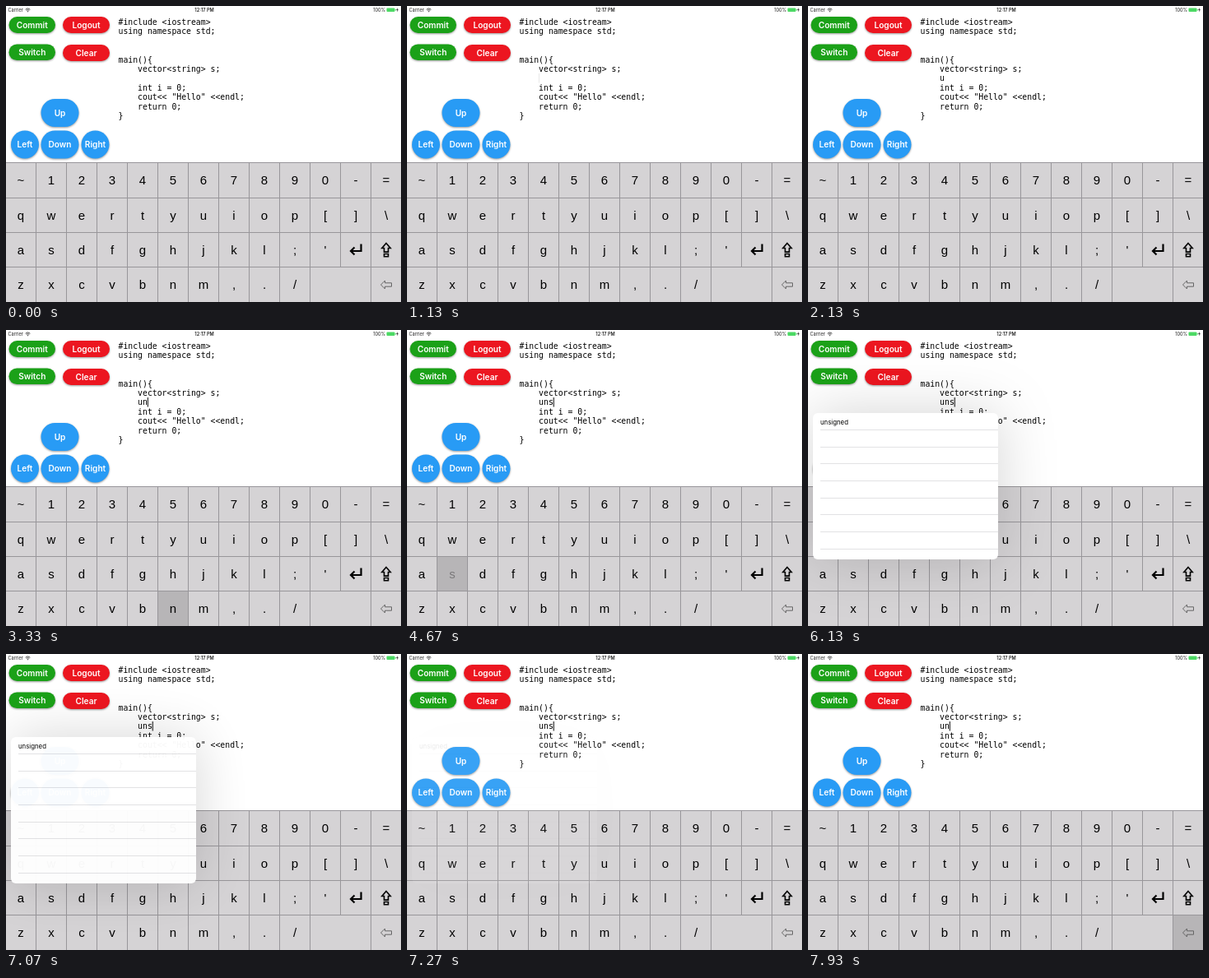
Recreate the animation shown at these times as an HTML page. Size 480 px wide and 360 px high, loop 8 s.

```html
<!DOCTYPE html>
<html lang="en">
<head>
<meta charset="utf-8">
<title>Code keyboard</title>
<style>
html, body { margin: 0; width: 100%; height: 100%; overflow: hidden; background: #fff; }
svg { display: block; width: 480px; height: 360px; }
text { white-space: pre; }
.ui { font-family: Inter, Roboto, sans-serif; }
.code { font: 9.8px "DejaVu Sans Mono", monospace; }
.key { font: 15px "Liberation Sans", Arial, sans-serif; text-anchor: middle; }
.btn text { font-size: 10.1px; font-weight: 600; fill: #fff; text-anchor: middle; }
.btn rect { filter: drop-shadow(0 1px 1px rgba(0,0,0,.4)); }
.status { font-size: 5.6px; fill: #222; }
.shade, .ripple, .typed { opacity: 0; }
.ripple { transform-box: fill-box; transform-origin: center; }

/* 1% = 80ms */
.shade, .label, .ripple, .popup, .blink { animation: 8s linear infinite; }
.typed, .caret { animation: 8s step-end infinite; }

.tap .shade { animation-name: tapShade; }
.tap .label { animation-name: tapLabel; }
.tap .shade, .tap .label { animation-delay: var(--at); }
@keyframes tapShade { 0% { opacity: 0 } 1.5%, 4.2% { opacity: 1 } 7.5%, 100% { opacity: 0 } }
@keyframes tapLabel { 0% { opacity: 1 } .8%, 1.6% { opacity: .4 } 2.6%, 100% { opacity: 1 } }

.hold .shade { animation-name: holdShade; }
.hold .label { animation-name: holdLabel; }
.hold .ripple { animation-name: holdRipple; }
@keyframes holdShade { 0%, 55.6% { opacity: 0 } 57%, 60% { opacity: 1 } 66%, 68% { opacity: .45 } 74%, 100% { opacity: 0 } }
@keyframes holdLabel { 0%, 55.6% { opacity: 1 } 56.5%, 59.5% { opacity: .33 } 61%, 100% { opacity: 1 } }
@keyframes holdRipple {
  0%, 59.5% { opacity: 0; transform: scale(.2) }
  61% { opacity: 1 }
  65.5%, 68% { opacity: 1; transform: none }
  74%, 100% { opacity: 0; transform: none }
}

.del .shade { animation-name: delShade; }
@keyframes delShade { 0%, 96.2% { opacity: 0 } 97.8%, 100% { opacity: 1 } }

.u { animation-name: typeU; }
.n { animation-name: typeN; }
.s { animation-name: typeS; }
@keyframes typeU { 0% { opacity: 0 } 18.2%, 100% { opacity: 1 } }
@keyframes typeN { 0% { opacity: 0 } 39.7%, 100% { opacity: 1 } }
@keyframes typeS { 0% { opacity: 0 } 56.6% { opacity: 1 } 97.5%, 100% { opacity: 0 } }

.caret { animation-name: step; }
@keyframes step {
  0% { transform: translateX(0) }
  18.2% { transform: translateX(5.9px) }
  39.7% { transform: translateX(11.8px) }
  56.6% { transform: translateX(17.7px) }
  97.5%, 100% { transform: translateX(11.8px) }
}
.blink { animation-name: blink; }
@keyframes blink {
  0%, 3% { opacity: 0 } 4.5%, 8% { opacity: 1 } 9.5%, 14% { opacity: 0 }
  15.5%, 24% { opacity: 1 } 25.6%, 28.4% { opacity: 0 } 30%, 33% { opacity: 1 }
  35%, 39.6% { opacity: 0 } 39.7%, 44.5% { opacity: 1 } 46.6%, 49% { opacity: 0 }
  50.5%, 53% { opacity: 1 } 54.5%, 56.5% { opacity: 0 } 56.6%, 68% { opacity: 1 }
  70%, 73% { opacity: 0 } 75%, 79% { opacity: 1 } 81%, 84% { opacity: 0 }
  86%, 91.5% { opacity: 1 } 93.5%, 97.4% { opacity: 0 } 97.5%, 99.8% { opacity: 1 } 100% { opacity: 0 }
}

.popup { animation-name: popup; }
.popup .panel { filter: drop-shadow(0 0 34px rgba(0,0,0,.17)); }
@keyframes popup {
  0%, 59.8% { opacity: 0 } 62.5%, 88.3% { opacity: 1 } 91.1%, 100% { opacity: 0 }
}
</style>
</head>
<body>
<svg viewBox="0 0 480 360">
  <rect width="480" height="360" fill="#fff"/>
  <g class="ui status">
    <text x="2.5" y="7">Carrier</text>
    <g fill="none" stroke="#222" stroke-width=".8">
      <path d="M23.6 4.2q2.9-2.6 5.8 0M24.7 5.4q1.8-1.6 3.6 0"/>
      <circle cx="26.5" cy="6.6" r=".4"/>
    </g>
    <text x="241" y="7" text-anchor="middle" font-weight="600">12:17 PM</text>
    <text x="461" y="7" text-anchor="end">100%</text>
    <rect x="462.5" y="2.5" width="10" height="4.5" rx="1" fill="#4cd964"/>
    <path d="M473.3 4v1.6" stroke="#4cd964"/>
    <path d="M476 2l-1.8 3h1.3l-.5 2.4 1.9-3.2h-1.3z"/>
  </g>
  <g id="code" class="code"></g>
  <g class="caret"><rect class="blink" x="159.9" y="82" width="1.2" height="11.5" fill="#222"/></g>
  <g id="buttons" class="ui btn"></g>
  <rect y="190" width="480" height="170" fill="#d5d3d5"/>
  <g id="keys"></g>
  <g id="popup" class="popup ui">
    <rect class="panel" x="6" y="101" width="225" height="178" rx="6" fill="#fff"/>
    <text x="15" y="114.5" font-size="7.8">unsigned</text>
  </g>
</svg>
<script>
const byId = id => document.getElementById(id);
const esc = s => s.replace(/&/g, "&amp;").replace(/</g, "&lt;");

// Code view
const advance = 5.9, leading = 11.4, left = 136.5, top0 = 23;
const line = (s, row, col = 0, cls = "") =>
  `<text class="${cls}" x="${left + col * advance}" y="${top0 + row * leading}">${esc(s)}</text>`;
const source = ["#include <iostream>", "using namespace std;", "", "", "main(){",
  "    vector<string> s;", "", "    int i = 0;", '    cout<< "Hello" <<endl;', "    return 0;", "}"];
byId("code").innerHTML = source.map((s, i) => line(s, i)).join("") +
  [..."uns"].map((c, i) => line(c, 6, 4 + i, "typed " + c)).join("");

// Round buttons
const green = "#1ba118", red = "#ec1620", blue = "#289bf5";
const button = ([label, x, y, w, h, color]) =>
  `<rect x="${x}" y="${y}" width="${w}" height="${h}" rx="${h / 2}" fill="${color}"/>
   <text x="${x + w / 2}" y="${y + h / 2 + 3.7}">${label}</text>`;
byId("buttons").innerHTML = [
  ["Commit", 3.5, 13, 56.5, 20, green], ["Logout", 69, 13, 57, 20, red],
  ["Switch", 3.5, 46.5, 56.5, 19.5, green], ["Clear", 69, 47, 57, 20, red],
  ["Up", 42.5, 113, 46, 34, blue], ["Left", 6, 151.5, 34, 34, blue],
  ["Down", 42.5, 151.5, 46, 34, blue], ["Right", 91.5, 151.5, 34, 34, blue]
].map(button).join("");

// Keyboard, with its lines on whole pixels
const colX = i => i * 37 - .5;
const rowY = j => Math.round(190.3 + j * 42.3) + .5;
const icons = {
  "⏎": `<path d="M6.5-7V1.5H-4.5M-1.5-3L-6 1.5L-1.5 6" fill="none" stroke="#000" stroke-width="2.2"/>`,
  "⇪": `<path d="M0-8L5.2-2H2.5V2.6H-2.5V-2H-5.2zM-2.5 5H2.5V8.2H-2.5z" fill="none" stroke="#000" stroke-width="1.6"/>`,
  "⌫": `<path d="M-6.5 0L-1.5-5V-2.2H6.5V2.2H-1.5V5z" fill="none" stroke="#666" stroke-width="1"/>`
};
const press = {
  u: 'class="tap" style="--at:-6620ms"',
  n: 'class="tap" style="--at:-4920ms"',
  s: 'class="hold"',
  "⌫": 'class="del"'
};
const rows = ["~1234567890-=", "qwertyuiop[]\\", "asdfghjkl;'⏎⇪", "zxcvbnm,./ _⌫"];
const key = (c, col, row) => {
  if (c === "_") return "";
  const x = colX(col), w = colX(col + (c === " " ? 2 : 1)) - x;
  const y = rowY(row), h = rowY(row + 1) - y;
  const cx = x + w / 2, cy = y + h / 2;
  const box = `x="${x}" y="${y}" width="${w}" height="${h}"`;
  const face = icons[c] ? `<g transform="translate(${cx} ${cy})">${icons[c]}</g>`
    : `<text class="key label" x="${cx}" y="${cy + 5.3}">${esc(c)}</text>`;
  const shade = press[c] ? `<rect class="shade" ${box} fill="#000" fill-opacity=".14"/>` : "";
  const ripple = c === "s" ? `<circle class="ripple" cx="${cx}" cy="${cy}" r="18" fill="#000" fill-opacity=".2"/>` : "";
  return `<g ${press[c] || ""}>${shade}${ripple}<rect ${box} fill="none" stroke="#98969a"/>${face}</g>`;
};
byId("keys").innerHTML = rows.map((r, j) => [...r].map((c, i) => key(c, i, j)).join("")).join("");

// Suggestion list rules
let rules = "";
for (let i = 0; i < 8; i++) rules += `M15 ${Math.round(121 + i * 20.65) + .5}H231`;
byId("popup").insertAdjacentHTML("beforeend", `<path d="${rules}" stroke="#e2e2e4"/>`);
</script>
</body>
</html>
```
